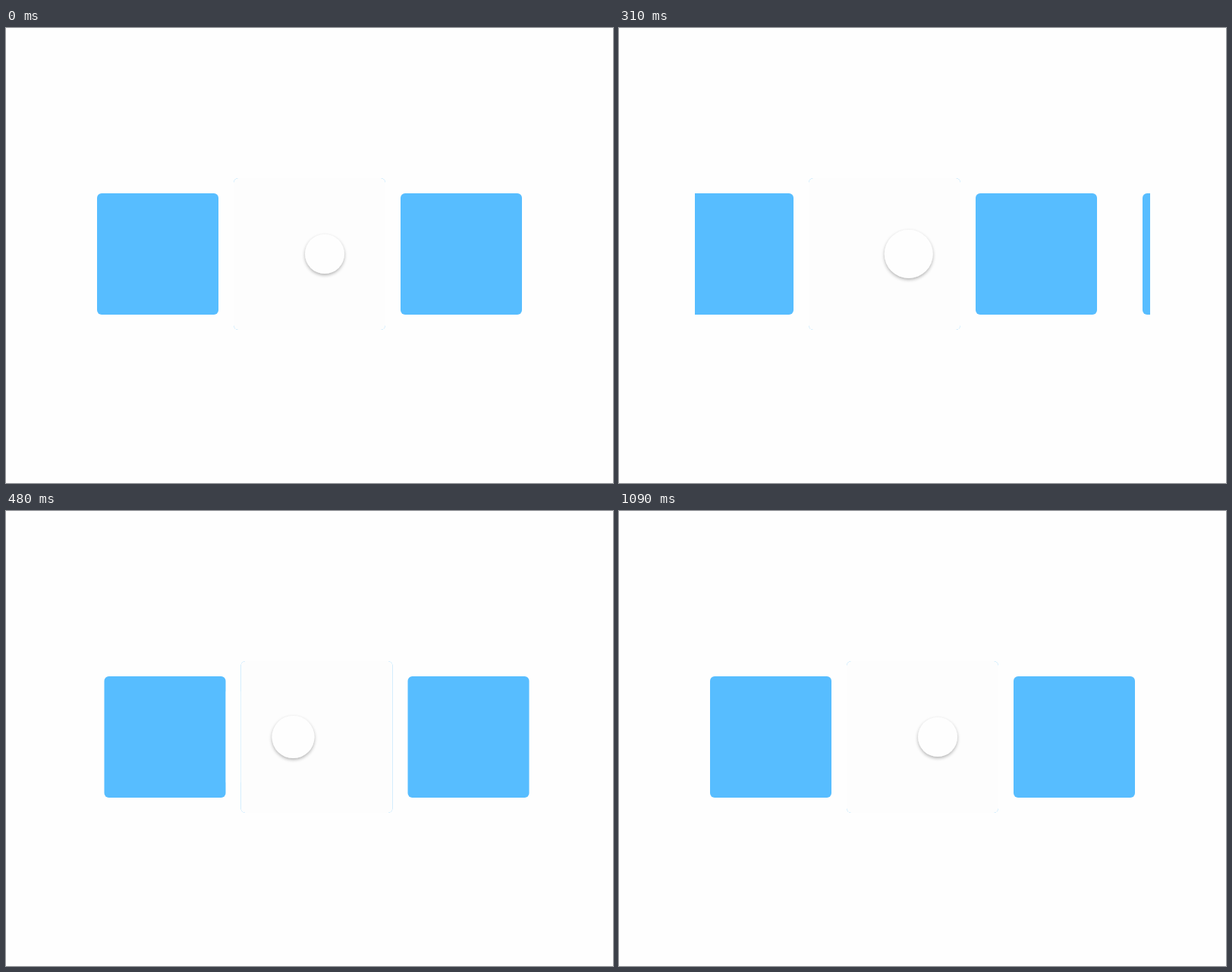
Write an HTML page with a canvas that moves like this. It is 800x600 px and loops after 1500 ms.

```html
<!DOCTYPE html>
<html lang="en">
<head>
<meta charset="utf-8">
<title>Card carousel</title>
<style>
  html, body { margin: 0; width: 100%; height: 100%; overflow: hidden; background: #fefefe; }
  canvas { display: block; width: 800px; height: 600px; }
</style>
</head>
<body>
<canvas id="stage" width="800" height="600"></canvas>
<script>
const ctx = document.getElementById('stage').getContext('2d');
const LOOP = 1500, MID_Y = 298, SMALL = 160, GROWTH = 40;
const BLUE = '#57bdff', PAPER = '#fefefe', CARD = '#fdfdfd';

// The picture advances in discrete steps of about 55 ms.
const STEPS = [0, 140, 200, 250, 310, 370, 420, 480, 530, 590, 650,
               700, 760, 810, 870, 920, 980, 1030, 1090];

// Scroll distance over time: drag, release, slight overshoot, settle.
const SCROLL = [[110, 0], [250, 36], [310, 50], [370, 161], [420, 190.5],
                [480, 210.5], [530, 217.5], [590, 220.5], [700, 221], [1000, 220]];

const clamp01 = v => Math.min(1, Math.max(0, v));
const easeOut = (t, from, to) => 1 - (1 - clamp01((t - from) / (to - from))) ** 2;

function along(keys, t) {
  if (t <= keys[0][0]) return keys[0][1];
  const i = keys.findIndex(k => k[0] > t);
  if (i < 0) return keys[keys.length - 1][1];
  const [t0, v0] = keys[i - 1], [t1, v1] = keys[i];
  return v0 + (v1 - v0) * (t - t0) / (t1 - t0);
}

function fillCard(x, size, color, alpha = 1) {
  ctx.globalAlpha = alpha;
  ctx.fillStyle = color;
  ctx.beginPath();
  ctx.roundRect(x, MID_Y - size / 2, size, size, 6);
  ctx.fill();
  ctx.globalAlpha = 1;
}

// focus 0 is a small blue card, focus 1 a large white one.
function drawCard(x, focus = 0) {
  const size = SMALL + GROWTH * focus;
  fillCard(x, size, BLUE);
  if (focus > 0) fillCard(x, size, CARD, focus);
}

function disc(x, y, r, color) {
  ctx.fillStyle = color;
  ctx.beginPath();
  ctx.arc(x, y, r, 0, 2 * Math.PI);
  ctx.fill();
}

function drawTouch(x, r) {
  ctx.save();
  ctx.beginPath();
  ctx.rect(0, 0, 800, 600);
  ctx.arc(x, MID_Y, r, 0, 2 * Math.PI);
  ctx.clip('evenodd');
  ctx.shadowColor = 'rgba(0,0,0,.3)';
  ctx.shadowBlur = 4;
  ctx.shadowOffsetY = 2;
  disc(x, MID_Y, r, '#fff');
  ctx.restore();
  disc(x, MID_Y, r, 'rgba(255,255,255,.37)');
}

// Between two cards the touch point appears tinted blue.
function drawTouchInGap(x, r, left, right) {
  ctx.save();
  ctx.beginPath();
  ctx.rect(left, 0, right - left, 600);
  ctx.clip();
  ctx.fillStyle = PAPER;
  ctx.fillRect(left, MID_Y - 60, right - left, 120);
  disc(x - 1, MID_Y + 1.5, r + 2, '#2da0e5');
  disc(x, MID_Y, r, '#6cc5fe');
  ctx.restore();
}

function draw(t) {
  const scroll = along(SCROLL, t);
  const turn = easeOut(t, 311, 482);
  const gapLeft = 500 - scroll, gapRight = gapLeft + 20;

  ctx.fillStyle = PAPER;
  ctx.fillRect(0, 0, 800, 600);
  ctx.save();
  ctx.beginPath();
  ctx.rect(100, 0, 600, 600);
  ctx.clip();
  drawCard(120 - scroll);
  drawCard(gapLeft - SMALL - GROWTH * (1 - turn), 1 - turn);
  drawCard(gapRight, turn);
  drawCard(740 - scroll);
  ctx.restore();

  const press = easeOut(t, 130, 380);
  const touchX = 420 - 41.5 * (press - easeOut(t, 530, 1090));
  const touchR = 26 + 6.5 * (press - easeOut(t, 425, 550));
  drawTouch(touchX, touchR);
  if (turn > 0 && turn < 1) drawTouchInGap(touchX, touchR, gapLeft, gapRight);
}

const start = performance.now();
function tick() {
  const t = (performance.now() - start) % LOOP;
  draw(STEPS.filter(s => s <= t).pop());
  requestAnimationFrame(tick);
}
tick();
</script>
</body>
</html>
```
